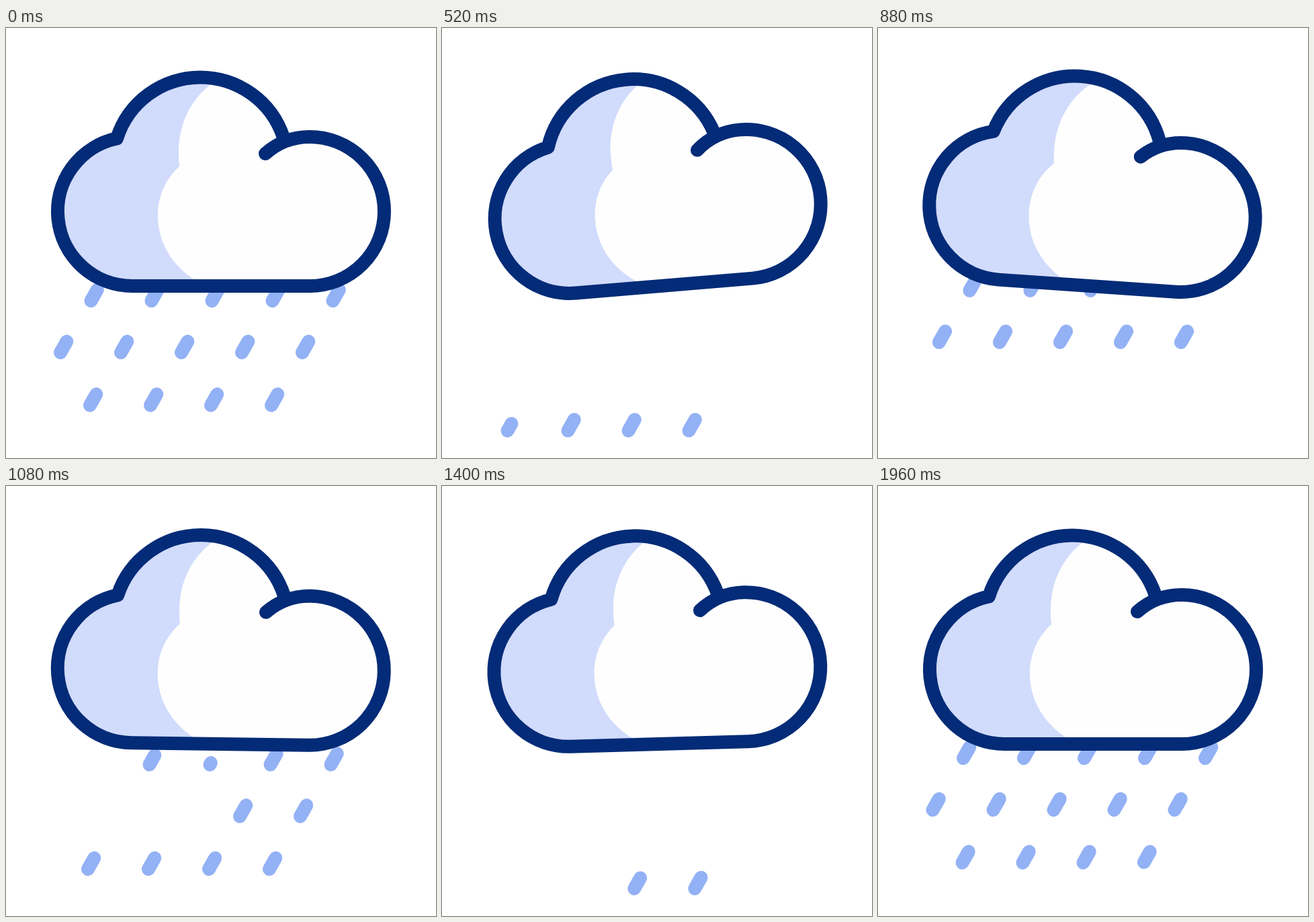
An HTML page with a canvas for the animation above (2 s loop, 640 by 640 pixels).

```html
<!DOCTYPE html>
<html>
<head>
<meta charset="utf-8">
<title>Rain cloud</title>
<style>
html, body { margin: 0; width: 100%; height: 100%; overflow: hidden; background: #fff; }
canvas { display: block; width: 640px; height: 640px; }
</style>
</head>
<body>
<canvas width="640" height="640"></canvas>
<script>
const ctx = document.querySelector('canvas').getContext('2d');
const NAVY = '#032b77', SHADE = '#d1dbfc', RAIN = '#93b1f5', WHITE = '#fefefe';
const LOOP = 2000, STEP = 40;

const cloud = new Path2D(`M386 187 C404 171 427 162 452 162 A111 111 0 0 1 452 384
  H188 A111 111 0 0 1 165 164.4 A130.3 130.3 0 0 1 413 163`);
const shade = new Path2D(`M306 74.6 V83 C275 106 257 143 257 185 Q257 196 258 206
  C238 224 226 250 226 279 C226 319 247 353 281 375 V384
  H188 A111 111 0 0 1 165 164.4 A130.3 130.3 0 0 1 306 74.6`);

// Rows of drops: x of the first one and y, both at the lower tip
const rows = [[126.5, 406], [81, 483], [125, 561.5]];
// [row, column] in order of appearance
const drops = [
  [1, 0], [1, 1], [1, 2], [0, 0], [0, 2], [0, 1], [1, 3], [1, 4], [0, 3], [0, 4],
  [2, 0], [2, 1], [2, 2], [2, 3]
];
const DROP_W = 9.3, DROP_H = 16.4;
const GROW = 33, SHRINK = 50;

// Three showers: travel time and offsets, then when each drop grows and is gone
const showers = [
  { t0: 0, t1: 760, from: [0, 0], to: [-36, 49.5],
    born: () => -100, gone: i => 220 + 22.9 * i + 1.026 * i * i },
  { t0: 520, t1: 1500, from: [23, -39.5], to: [-20, 40],
    born: i => 575 + 35 * i, gone: i => 980 + 21 * i + 1.5 * i * i },
  { t0: 1530, t1: 2000, from: [23, -40], to: [0, 0],
    born: i => 1515 + 31.8 * i, gone: () => 2100 }
];

// [time, degrees]
const sway = [[0, 0], [520, -4.75], [920, 4.2], [1240, -2.66], [1620, 0], [LOOP, 0]];

const clamp = v => Math.min(1, Math.max(0, v));
const mix = (a, b, p) => a + (b - a) * p;
const ease = p => p * p * (3 - 2 * p);

function angle(t) {
  const k = sway.findIndex(([time]) => time > t);
  const [[ta, a], [tb, b]] = [sway[k - 1], sway[k]];
  return mix(a, b, ease((t - ta) / (tb - ta))) * Math.PI / 180;
}

function drawShower({ t0, t1, from, to, born, gone }, t) {
  const p = ease(clamp((t - t0) / (t1 - t0)));
  const dx = mix(from[0], to[0], p), dy = mix(from[1], to[1], p);
  drops.forEach(([row, col], i) => {
    // A drop grows downwards from its upper tip and shrinks into its lower one
    const head = clamp((t - born(i)) / GROW);
    const tail = clamp(1 - (gone(i) - t) / SHRINK);
    if (head <= tail) return;
    const x = rows[row][0] + 90 * col + dx, y = rows[row][1] + dy;
    ctx.beginPath();
    ctx.moveTo(x + DROP_W * (1 - tail), y - DROP_H * (1 - tail));
    ctx.lineTo(x + DROP_W * (1 - head), y - DROP_H * (1 - head));
    ctx.stroke();
  });
}

function drawCloud(t) {
  ctx.save();
  ctx.translate(320, 258);
  ctx.rotate(angle(t));
  ctx.translate(-320, -258);
  ctx.fillStyle = WHITE;
  ctx.fill(cloud);
  ctx.fillStyle = SHADE;
  ctx.fill(shade);
  ctx.strokeStyle = NAVY;
  ctx.stroke(cloud);
  ctx.restore();
}

function draw() {
  const t = Math.floor(performance.now() % LOOP / STEP) * STEP;
  ctx.fillStyle = '#fff';
  ctx.fillRect(0, 0, 640, 640);
  ctx.lineWidth = 20;
  ctx.lineCap = ctx.lineJoin = 'round';
  ctx.strokeStyle = RAIN;
  showers.forEach(s => drawShower(s, t));
  drawCloud(t);
  requestAnimationFrame(draw);
}
draw();
</script>
</body>
</html>
```
